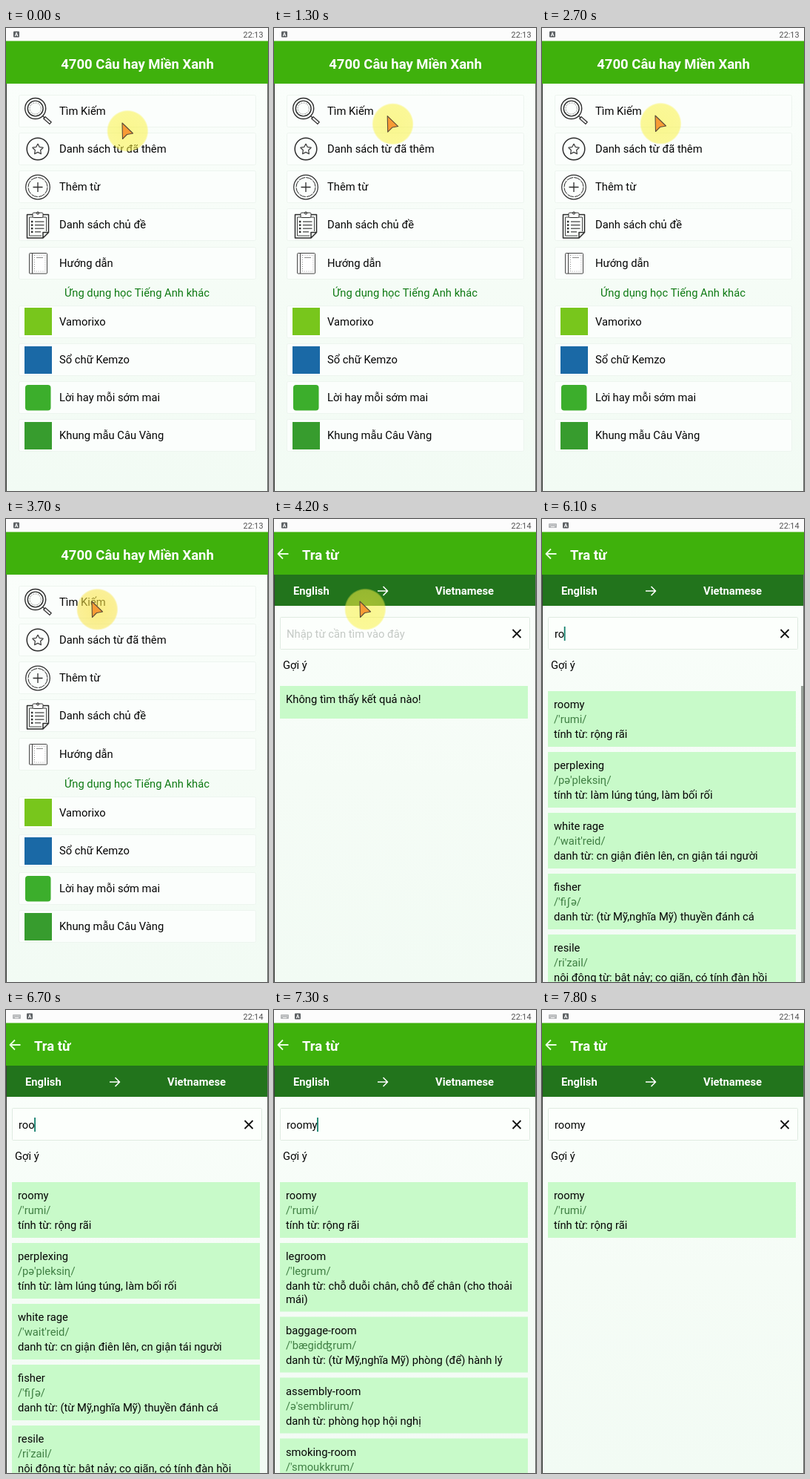
Write an HTML page with a canvas that moves like this. It is 354 by 624 pixels and loops after 8000 ms.

```html
<!DOCTYPE html>
<html lang="vi">
<head>
<meta charset="utf-8">
<title>Từ vựng</title>
<style>
html, body { margin: 0; width: 100%; height: 100%; overflow: hidden; background: #f5fcf7; }
canvas { display: block; width: 354px; height: 624px; }
</style>
</head>
<body>
<canvas id="stage" width="354" height="624"></canvas>
<script>
const W = 354, H = 624, LOOP = 8000;
const ctx = document.getElementById('stage').getContext('2d');
const FONT = 'Roboto, "Noto Sans", "DejaVu Sans", sans-serif';
const BODY = 14.75, HEAD = 18.5;
const INK = '#050505', LINE = '#2c2c2c';

function text(s, x, y, { size = BODY, color = INK, weight = 400, align = 'left' } = {}) {
  ctx.font = `${weight} ${size}px ${FONT}`;
  ctx.fillStyle = color;
  ctx.textAlign = align;
  ctx.fillText(s, x, y);
  return ctx.measureText(s).width;
}

function rect(x, y, w, h, color) {
  ctx.fillStyle = color;
  ctx.fillRect(x, y, w, h);
}

function box(x, y, w, h, r, fill, stroke) {
  ctx.beginPath();
  ctx.roundRect(x, y, w, h, r);
  if (fill) { ctx.fillStyle = fill; ctx.fill(); }
  if (stroke) { ctx.strokeStyle = stroke; ctx.stroke(); }
}

// Polylines, each a flat list of x, y pairs
function lines(color, width, ...paths) {
  ctx.strokeStyle = color;
  ctx.lineWidth = width;
  ctx.beginPath();
  for (const p of paths) {
    ctx.moveTo(p[0], p[1]);
    for (let i = 2; i < p.length; i += 2) ctx.lineTo(p[i], p[i + 1]);
  }
  ctx.stroke();
  ctx.lineWidth = 1;
}

function ring(x, y, r, width, dash = []) {
  ctx.setLineDash(dash);
  ctx.strokeStyle = LINE;
  ctx.lineWidth = width;
  ctx.beginPath();
  ctx.arc(x, y, r, 0, Math.PI * 2);
  ctx.stroke();
  ctx.setLineDash([]);
  ctx.lineWidth = 1;
}

// ---- shared chrome ----

function background() {
  const g = ctx.createLinearGradient(0, 75, 0, H);
  g.addColorStop(0, '#fafefb');
  g.addColorStop(0.5, '#f5fcf6');
  g.addColorStop(1, '#f2fbf4');
  rect(0, 0, W, H, g);
}

function statusBar(clock, keyboard) {
  rect(0, 0, W, 18, '#fcfcfc');
  const x = keyboard ? 28 : 10;
  if (keyboard) {
    box(9, 6, 11, 6, 1, '#b4b6b8');
    for (let i = 0; i < 4; i++) rect(10.5 + i * 2.2, 7.5, 1, 1, '#f5f5f5');
    rect(12, 10, 5, 1, '#f5f5f5');
  }
  box(x, 4.5, 8, 8, 1, '#5c6063');
  text('A', x + 4, 11.2, { size: 7, weight: 700, color: '#fff', align: 'center' });
  text(clock, 347.5, 13, { size: 10.8, color: '#505050', align: 'right' });
}

function header() {
  rect(0, 17.5, W, 57.5, '#3fb10c');
}

function edges() {
  rect(0, 75, 1, H - 75, '#3a3f3a');
  rect(353, 75, 1, H - 75, '#6b706b');
}

// ---- menu screen ----

function searchIcon() {
  ring(39.7, 108.5, 14, 1.4);
  ring(39.7, 108.5, 10.4, 1.4);
  ring(39.7, 108.5, 7.6, 0.9, [1, 2]);
  lines(LINE, 1.3, [49.5, 118.5, 52.5, 121.5]);
  lines(LINE, 4.6, [51.5, 120.5, 60.5, 128.5]);
  lines('#fafafa', 2.2, [52.5, 121.4, 59.6, 127.7]);
}

function starIcon() {
  ring(43, 163, 14.8, 1.5);
  const star = [];
  for (let i = 0; i <= 10; i++) {
    const a = -Math.PI / 2 + i * Math.PI / 5, r = i % 2 ? 3.8 : 7.5;
    star.push(43 + r * Math.cos(a), 163.5 + r * Math.sin(a));
  }
  lines('#444', 1.3, star);
}

function plusIcon() {
  ring(43, 214.5, 16.3, 1.2);
  ring(43, 214.5, 13, 1, [9, 1.2]);
  lines(LINE, 1.3, [36.5, 214.5, 49.5, 214.5], [43, 208, 43, 221]);
}

function clipboardIcon() {
  lines(LINE, 1.5, [50, 283, 28.5, 283, 28.5, 251.5, 57.5, 251.5, 57.5, 275.5, 50, 283, 50, 275.5, 57.5, 275.5]);
  lines(LINE, 0.9, [48, 280, 31.5, 280, 31.5, 255, 54.5, 255, 54.5, 274]);
  box(36, 249, 14, 6.5, 1.5, '#fff', LINE);
  ring(43, 249.5, 1.6, 1);
  for (let i = 0; i < 4; i++) {
    const y = 261 + i * 4.6;
    rect(34, y - 1.2, 2.4, 2.4, LINE);
    lines(LINE, 1.1, [39, y, i < 3 ? 51.5 : 47, y]);
  }
}

function bookIcon() {
  box(31.5, 303.5, 24, 27.5, 1, '#fff', '#444');
  lines('#444', 1, [35.5, 303, 35.5, 331]);
  lines('#888', 1, [41, 309.5, 50, 309.5]);
  ctx.setLineDash([1, 2]);
  lines('#999', 1, [38.5, 306, 53, 306, 53, 328, 38.5, 328, 38.5, 306]);
  ctx.setLineDash([]);
}

const square = (x, y, size, r, color) => () => box(x, y, size, size, r, color);

const MENU = [
  [90, 'Tìm Kiếm', searchIcon],
  [141, 'Danh sách từ đã thêm', starIcon],
  [192, 'Thêm từ', plusIcon],
  [243, 'Danh sách chủ đề', clipboardIcon],
  [295, 'Hướng dẫn', bookIcon],
  [374, 'Vamorixo', square(25, 377, 37, 0, '#78c61c')],
  [425, 'Sổ chữ Kemzo', square(25, 429, 37, 0, '#1a69a6')],
  [476, 'Lời hay mỗi sớm mai', square(26, 481, 34.5, 4, '#3cae2c')],
  [527, 'Khung mẫu Câu Vàng', square(25, 531, 37, 0, '#379c2e')]
];

function menuScreen() {
  background();
  statusBar('22:13', false);
  header();
  text('4700 Câu hay Miền Xanh', 177.5, 55, { size: HEAD, weight: 700, color: '#fff', align: 'center' });
  for (const [y, label, icon] of MENU) {
    box(17.5, y + 0.5, 320, 43, 2, '#fbfefc', '#edf5ef');
    icon();
    text(label, 72, y + 27);
  }
  text('Ứng dụng học Tiếng Anh khác', 177, 361.5, { color: '#0f7a14', align: 'center' });
  edges();
}

// ---- lookup screen ----

const ROOMY = ['roomy', "/'rumi/", 'tính từ: rộng rãi'];
const LIST_R = [
  ROOMY,
  ['perplexing', "/pə'pleksiɳ/", 'tính từ: làm lúng túng, làm bối rối'],
  ['white rage', "/'wait'reid/", 'danh từ: cn giận điên lên, cn giận tái người'],
  ['fisher', "/'fiʃə/", 'danh từ: (từ Mỹ,nghĩa Mỹ) thuyền đánh cá'],
  ['resile', "/ri'zail/", 'nội động từ: bật nảy; co giãn, có tính đàn hồi']
];
const LIST_ROOM = [
  ROOMY,
  ['legroom', "/'legrum/", 'danh từ: chỗ duỗi chân, chỗ để chân (cho thoải', 'mái)'],
  ['baggage-room', "/'bægidʤrum/", 'danh từ: (từ Mỹ,nghĩa Mỹ) phòng (để) hành lý'],
  ['assembly-room', "/ə'semblirum/", 'danh từ: phòng họp hội nghị'],
  ['smoking-room', "/'smoukkrum/", 'danh từ: phòng hút thuốc']
];

const TYPED = [[7100, 'roomy'], [6800, 'room'], [6500, 'roo'], [6000, 'ro'], [5800, 'r'], [0, '']];
const RESULTS = [[7400, [ROOMY]], [6900, LIST_ROOM], [5900, LIST_R], [0, null]];
const at = (steps, t) => steps.find(s => t >= s[0])[1];

const CARD = '#c8fac9';

function results(list) {
  let y = 232;
  for (const [word, sound, ...meaning] of list) {
    const h = 75 + (meaning.length - 1) * 17.5;
    rect(8, y, 335, h, CARD);
    text(word, 16, y + 23);
    text(sound, 16, y + 43, { color: '#3f7f43' });
    meaning.forEach((m, i) => text(m, 16, y + 63 + i * 17.5));
    y += h + 7;
  }
}

function lookupScreen(t) {
  background();
  statusBar('22:14', t >= 4700);
  header();
  lines('#e9ffe0', 1.8, [19.5, 47, 6, 47], [12, 40.5, 5.5, 47, 12, 53.5]);
  text('Tra từ', 38, 55, { size: HEAD, weight: 700, color: '#fff' });

  rect(0, 75, W, 42, '#22741c');
  text('English', 26, 102, { weight: 700, color: '#fff' });
  lines('#fff', 1.6, [140, 97, 153, 97], [147.5, 91, 153.5, 97, 147.5, 103]);
  text('Vietnamese', 218, 102, { weight: 700, color: '#fff' });

  box(8.5, 132.5, 337, 43, 1, '#fcfffc', '#dfebe1');
  const typed = at(TYPED, t);
  let width = 0;
  if (typed) width = text(typed, 17, 160);
  else text('Nhập từ cần tìm vào đây', 17, 160, { color: '#c4c9c5' });
  const caret = (t >= 4700 && t < 5200) || (t >= 5700 && t < 7800);
  if (caret) rect(16.5 + width, 145, 1.8, 19, '#12806c');
  lines('#111', 1.8, [322.5, 149, 333.5, 160], [333.5, 149, 322.5, 160]);

  text('Gợi ý', 12, 202);
  const list = at(RESULTS, t);
  if (list) {
    results(list);
  } else {
    rect(8, 225, 335, 44, CARD);
    text('Không tìm thấy kết quả nào!', 16, 248);
  }
  edges();
  if (t >= 5900 && t < 6600) rect(350, 225, 3, H - 225, '#9aa29b');
}

// ---- pointer ----

// start, end, target x, target y of the arrow tip
const MOVES = [
  [100, 1500, 153, 118],
  [2750, 3600, 116, 111],
  [4500, 5000, 117, 155]
];

function tip(t) {
  let x = 157, y = 128;
  for (const [a, b, tx, ty] of MOVES) {
    const u = Math.min(1, Math.max(0, (t - a) / (b - a)));
    const k = u * u * (3 - 2 * u);
    x += (tx - x) * k;
    y += (ty - y) * k;
  }
  return [x, y];
}

function pointer(t) {
  const [x, y] = tip(t);
  const press = Math.max(0, 1 - Math.abs(t - 3750) / 350);
  const cx = x + 7.3, cy = y + 10.8, r = 28;
  const g = ctx.createRadialGradient(cx, cy, 0, cx, cy, r);
  const tone = a => `rgba(250,${242 - press * 16},66,${a})`;
  g.addColorStop(0, tone(0.58 + press * 0.08));
  g.addColorStop(0.93, tone(0.54));
  g.addColorStop(1, tone(0.15));
  ctx.fillStyle = g;
  ctx.beginPath();
  ctx.arc(cx, cy, r, 0, Math.PI * 2);
  ctx.fill();

  ctx.beginPath();
  ctx.moveTo(x, y);
  ctx.lineTo(x + 14.5, y + 14);
  ctx.lineTo(x + 6.5, y + 15.5);
  ctx.lineTo(x + 0.5, y + 21.5);
  ctx.closePath();
  ctx.fillStyle = '#f79b35';
  ctx.fill();
  ctx.lineJoin = 'round';
  ctx.lineWidth = 1.1;
  ctx.strokeStyle = '#5b4a38';
  ctx.stroke();
  ctx.lineWidth = 1;
}

function draw(t) {
  if (t < 4100) menuScreen();
  else lookupScreen(t);
  if (t < 5800) pointer(t);
}

const start = performance.now();
function frame() {
  draw((performance.now() - start) % LOOP);
  requestAnimationFrame(frame);
}
frame();
</script>
</body>
</html>
```
